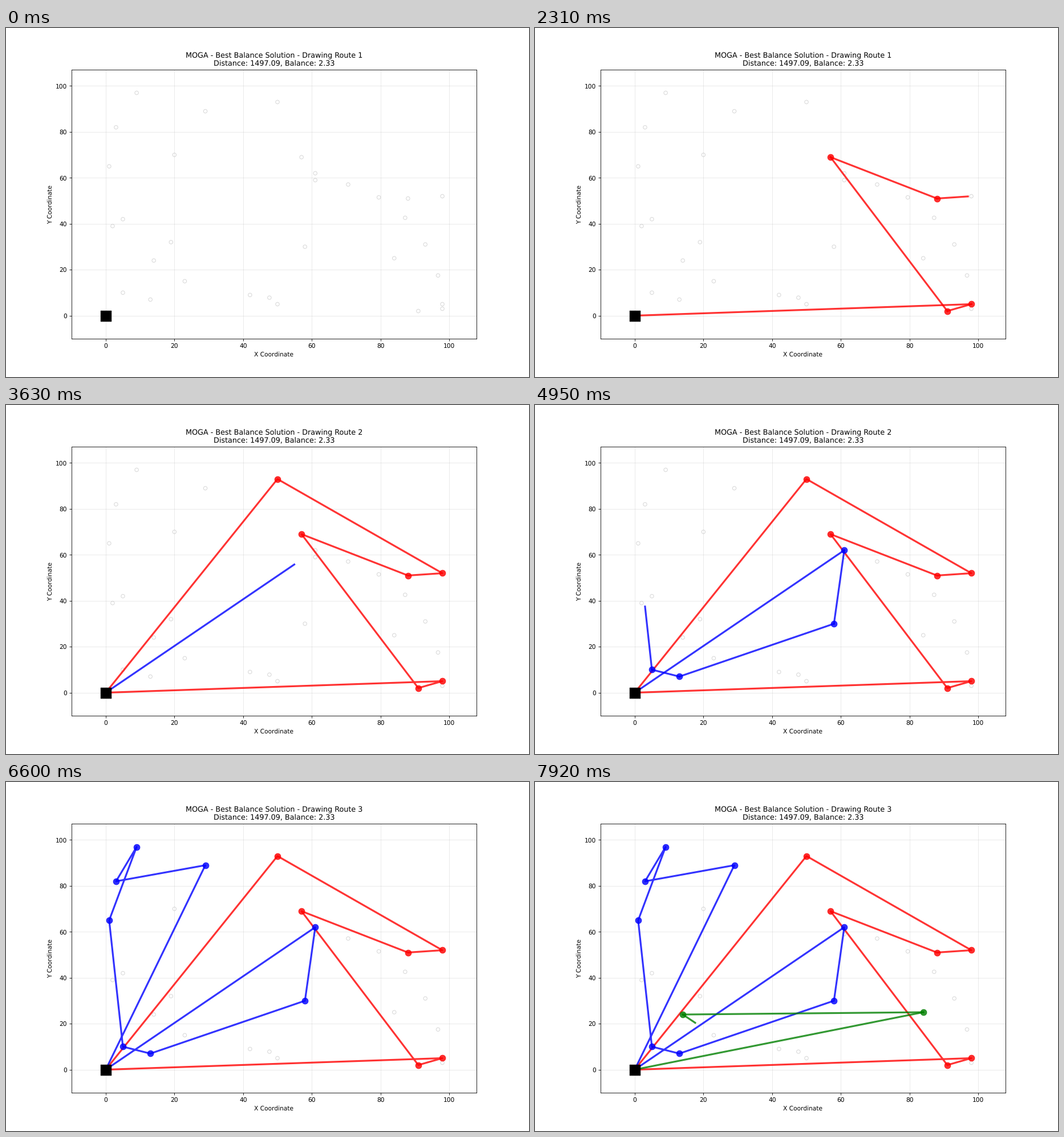
Recreate the animation shown at these times as a matplotlib script. Size 917 by 611 pixels, loop 8000 ms.

```python
import numpy as np
import matplotlib.pyplot as plt
from matplotlib.animation import FuncAnimation

W, H = 917, 611
DPI = W / 12
LOOP, TICK = 8000, 40      # ms
HOLD = 330                 # ms per drawing step
STEPS = 10                 # steps per route


def arc(cx, cy, rx, ry, count):
    """Points on a quarter ellipse, from its top round to its right end."""
    t = np.linspace(0, np.pi / 2, count)
    return list(zip(cx + rx * np.sin(t), cy + ry * np.cos(t)))


DEPOT = (0, 0)
EAST = arc(61, 3, 37, 56, 7)
SOUTH = arc(42, 5, 8, 4, 3)
WEST = [(2, 39), (5, 42), (19, 32), (20, 70)]
ROUTES = [
    ("red", [(98, 5), (91, 2), (57, 69), (88, 51), (98, 52), (50, 93)]),
    ("blue", [(61, 62), (58, 30), (13, 7), (5, 10), (1, 65), (9, 97),
              (3, 82), (29, 89)]),
    ("green", [(84, 25), (14, 24), (23, 15), *SOUTH[:2]]),
]

plt.rcParams["text.hinting"] = "none"
fig, ax = plt.subplots(figsize=((W + 1e-6) / DPI, (H + 1e-6) / DPI), dpi=DPI)
fig.subplots_adjust(left=0.125, right=0.9, bottom=0.11, top=0.88)
ax.set(xlim=(-10, 108), ylim=(-10, 107), xlabel="X Coordinate",
       ylabel="Y Coordinate", xticks=range(0, 101, 20),
       yticks=range(0, 101, 20))
ax.grid(True, alpha=0.3)

customers = {*EAST, *SOUTH, *WEST}.union(*(stops for _, stops in ROUTES))
ax.scatter(*zip(*customers), s=36, facecolors="none", edgecolors="gray",
           linewidths=1, alpha=0.3)
ax.scatter(*DEPOT, s=300, c="black", marker="s", zorder=10, snap=False)

drawn = []
last_step = None


def add_line(points, color):
    drawn.extend(ax.plot(*zip(*points), "-", color=color, lw=3, alpha=0.8))


def add_stops(points, color):
    if points:
        drawn.append(ax.scatter(*zip(*points), s=100, c=color, linewidths=1,
                                alpha=0.8, zorder=2))


def draw_full(color, stops):
    add_line([DEPOT, *stops, DEPOT], color)
    add_stops(stops, color)


def draw_partial(color, stops, step):
    path = [DEPOT, *stops, DEPOT]
    done, rest = divmod(step * (len(path) - 1), STEPS)
    for a, b in zip(path[:done], path[1:done + 1]):
        add_line([a, b], color)
    if rest:
        (x0, y0), (x1, y1) = path[done], path[done + 1]
        f = rest / STEPS
        add_line([(x0, y0), (x0 + f * (x1 - x0), y0 + f * (y1 - y0))], color)
    add_stops(stops[:done], color)


def update(i):
    global last_step
    # the small lead keeps each step from starting late on the tick grid
    step = (i * TICK + 30) // HOLD
    if step == last_step:
        return drawn
    last_step = step
    while drawn:
        drawn.pop().remove()
    current, part = divmod(step, STEPS)
    for color, stops in ROUTES[:current]:
        draw_full(color, stops)
    draw_partial(*ROUTES[current], part)
    ax.set_title("MOGA - Best Balance Solution - Drawing Route "
                 f"{current + 1}\nDistance: 1497.09, Balance: 2.33",
                 linespacing=1.25)
    return drawn


anim = FuncAnimation(fig, update, frames=LOOP // TICK, interval=TICK,
                     repeat=True, repeat_delay=0, blit=False)
plt.show()
```
